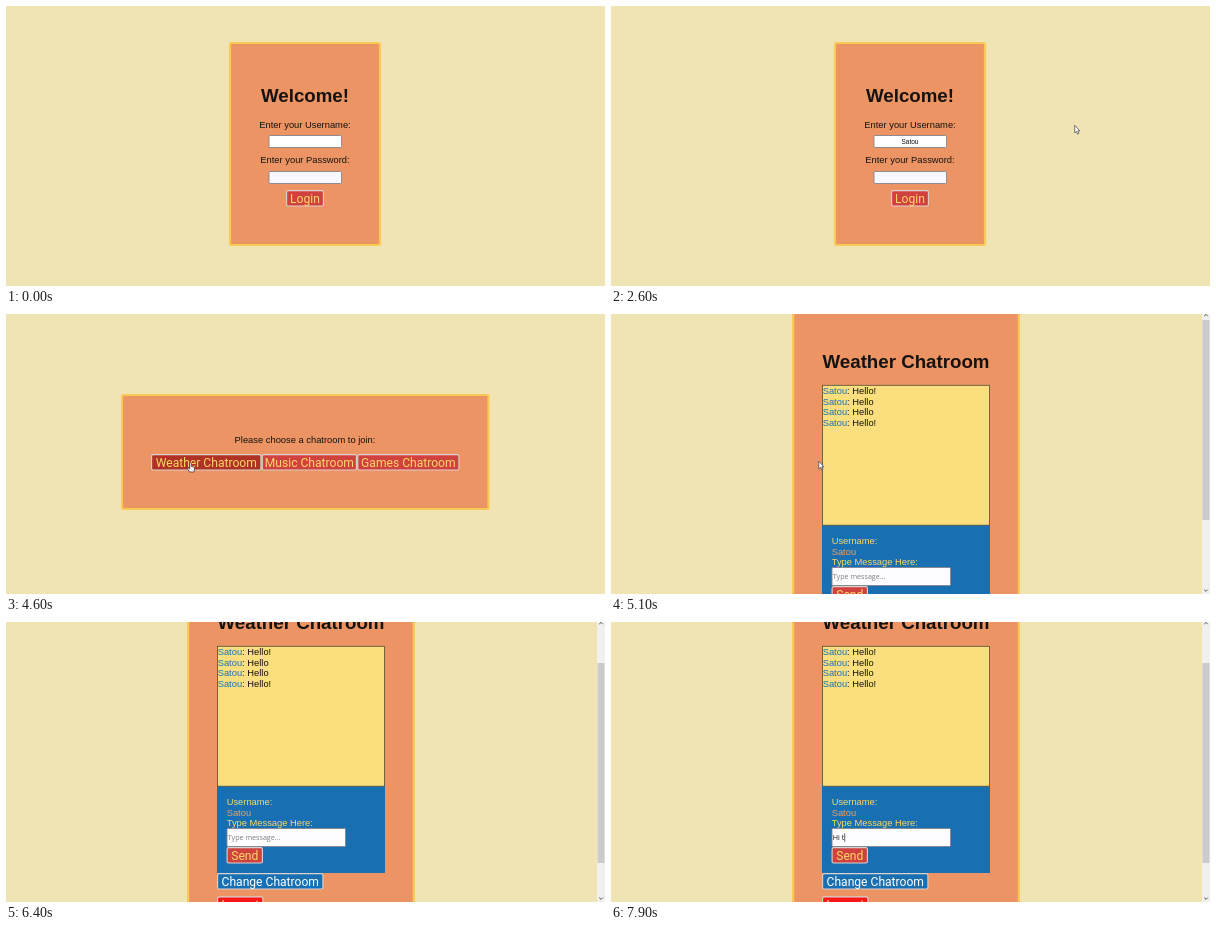
An HTML page for the animation above (8 s loop, 599 px wide and 280 px high).

```html
<!DOCTYPE html>
<html lang="en">
<head>
<meta charset="utf-8">
<title>Chat login</title>
<style>
  html, body { margin: 0; width: 100%; height: 100%; overflow: hidden; background: #f0e4b4; }
  svg { display: block; width: 599px; height: 280px; }
  text { font: 9.36px "Liberation Sans", Arial, sans-serif; fill: #151311; white-space: pre; }
  .title { font-size: 18.72px; font-weight: bold; }
  .btn { font: 12.1px Roboto, "Noto Sans", sans-serif; }
  .small { font: 5.35px "Open Sans", "Noto Sans", sans-serif; }
  .field { font: 7.15px "Open Sans", "Noto Sans", sans-serif; }
  .name { font-size: 6.5px; }
  .mid { text-anchor: middle; }
</style>
</head>
<body>
<svg id="stage" viewBox="0 0 599 280"></svg>
<script>
const LOOP = 8000, STEP = 100;
const USER = "Satou";
const C = {
  panel: "#ec9463", edge: "#fbc958", red: "#d1423f", hover: "#b03224",
  gold: "#fbd968", blue: "#1870b2", box: "#fbdf7f", line: "#85858f"
};

// markup helpers
const rect = (x, y, w, h, fill, extra = "") =>
  `<rect x="${x}" y="${y}" width="${w}" height="${h}" fill="${fill}" ${extra}/>`;
const text = (x, y, str, cls = "", fill = "") =>
  `<text x="${x}" y="${y}" class="${cls}"${fill && ` style="fill:${fill}"`}>${str}</text>`;
const group = (id, body) => `<g id="${id}">${body}</g>`;
const panel = (x, y, w, h) =>
  rect(x + 1, y + 1, w - 2, h - 2, C.panel, `rx="1.5" stroke="${C.edge}" stroke-width="2.2"`);
const input = (x, y, w, h, fill = "#fff") =>
  rect(x + .5, y + .5, w - 1, h - 1, fill, `rx="1" stroke="${C.line}" stroke-width=".9"`);
const button = (x, y, w, label, id = "", fill = C.red, ink = C.gold) =>
  rect(x + .6, y + .6, w - 1.2, 15.4, fill, `id="${id}" rx="1.6" stroke="#dcd2cf" stroke-width="1.1"`) +
  text(x + w / 2, y + 13, label, "btn mid", ink);

const popup =
  rect(264, 144, 95, 42, "#54443c", 'opacity=".65"') +
  rect(262.5, 142.5, 95, 42, "#fdfcfd", 'stroke="#9b9698" stroke-width=".8"') +
  rect(263, 168.5, 94, 15.6, "#ececed") +
  rect(265, 154.6, 4.6, 3.8, "#5c5659", 'rx=".5"') +
  '<path d="M265.9 155v-1.2a1.4 1.6 0 0 1 2.8 0V155" fill="none" stroke="#5c5659" stroke-width=".9"/>' +
  '<path d="M264.2 158.8l6-6.4" stroke="#d0324a" stroke-width="1"/>' +
  ["This connection is not secure.", "Logins entered here could be", "compromised. Learn More"]
    .map((s, i) => text(272, 150.2 + i * 7.5, s, "small", "#77737a")).join("") +
  text(309.5, 178.8, "View Saved Logins", "small mid", "#252326");

const login =
  panel(223, 36, 152, 204) +
  text(299, 96, "Welcome!", "title mid") +
  text(299, 121.5, "Enter your Username:", "mid") +
  input(262.5, 129, 73.5, 13) +
  text(299, 138.3, "", "name mid").replace("<text", '<text id="user"') +
  text(299, 157.3, "Enter your Password:", "mid") +
  input(262.5, 165, 73.5, 13, "#f9f8fe") +
  group("dots", "") +
  button(280, 184, 38, "Login") +
  group("popup", popup);

const rooms =
  panel(115, 80, 368.5, 116) +
  text(299, 128.5, "Please choose a chatroom to join:", "mid") +
  button(145, 140, 110.5, "Weather Chatroom", "weather") +
  button(255.7, 140, 95.3, "Music Chatroom") +
  button(351.2, 140, 102.3, "Games Chatroom");

const messages = ["Hello!", "Hello", "Hello", "Hello!"].map((m, i) =>
  text(211.7, 80 + i * 10.65, `<tspan fill="${C.blue}" style="fill:${C.blue}">${USER}</tspan>: ${m}`)).join("");

const chat =
  rect(181, 0, 228, 280, C.edge) +
  rect(183.2, 0, 223.6, 280, C.panel) +
  group("page",
    text(295, 54, "Weather Chatroom", "title mid") +
    rect(211, 211, 168, 87, C.blue) +
    rect(211.5, 71.3, 167, 139.9, C.box, 'stroke="#54502f" stroke-width=".8"') +
    messages +
    text(220.7, 230, "Username:", "", C.gold) +
    text(220.7, 240.6, USER, "", "#e9a066") +
    text(220.7, 251.2, "Type Message Here:", "", C.gold) +
    input(220.5, 253, 119.5, 19, "#fdfcfe") +
    '<text id="draft" class="field" x="221.8" y="265.4"></text>' +
    rect(0, 258.4, .7, 8.4, "#222", 'id="caret"') +
    button(220.5, 272, 36.5, "Send") +
    button(211, 298, 106.5, "Change Chatroom", "", C.blue, "#fff") +
    button(211, 321.3, 46.5, "Logout", "", "#fa1716", "#fbe08a")) +
  rect(591, 0, 8, 280, "#f1f0f1") +
  rect(591.5, 0, 7, 200, "#cbcacc", 'id="thumb"') +
  '<path d="M593.2 2.2l1.8-1.8 1.8 1.8M593.2 275.6l1.8 1.8 1.8-1.8" fill="none" stroke="#555" stroke-width="1"/>';

const status =
  rect(-1, 271, 141, 10, "#e9e7e5", 'stroke="#d2cec4" stroke-width=".5"') +
  text(1, 277.5, "Waiting for xml-chat-app.satouminakawa.com...", "small", "#4c4a4a");

const arrow = '<path d="M0 0V7.6L1.7 6.1 2.9 8.8 4.1 8.3 3 5.6H5.2Z" fill="#fff" stroke="#3b3a4c" stroke-width=".7"/>';
const hand = '<path d="M-.8 .3Q0-.6 .8 .3V3.4L3.6 4.2Q4.4 4.6 4.1 6L3.4 9H-.9L-3 5.8Q-3.2 4.5-2 4.9L-.8 5.9Z" fill="#fff" stroke="#2b2224" stroke-width=".7"/>';

document.getElementById("stage").innerHTML =
  rect(0, 0, 599, 280, "#f0e4b4") +
  group("login", login) + group("rooms", rooms) + group("chat", chat) +
  group("status", status) + group("arrow", arrow) + group("hand", hand);

const $ = id => document.getElementById(id);
const show = (id, on) => $(id).setAttribute("visibility", on ? "inherit" : "hidden");
const move = (id, x, y) => $(id).setAttribute("transform", `translate(${x} ${y})`);
const within = (t, a, b) => t >= a && t < b;
const typed = (t, start, gap, max) =>
  Math.max(0, Math.min(max, Math.floor((t - start) / gap) + 1));
const ease = p => p * p * (3 - 2 * p);

// rows: time, value, value...
function track(rows, t) {
  let i = rows.findIndex(r => r[0] > t);
  if (i < 0) return rows.at(-1).slice(1);
  if (i === 0) return rows[0].slice(1);
  const a = rows[i - 1], b = rows[i], p = ease((t - a[0]) / (b[0] - a[0]));
  return a.slice(1).map((v, k) => v + (b[k + 1] - v) * p);
}

const POINTER = [
  [1000, 325, 135], [1500, 463.7, 119.3], [3900, 463.7, 119.3], [4500, 184.5, 149],
  [5000, 184.5, 149], [5500, 408.3, 132.3], [5900, 408.3, 132.3], [6300, 330, 216]
];
const SCROLL = [[5900, 0], [6200, 47]];

function draw(t) {
  const onLogin = t < 3800, onChat = t >= 5000, overRoom = within(t, 4400, 5000);
  show("login", onLogin);
  show("rooms", !onLogin && !onChat);
  show("chat", onChat);
  show("status", within(t, 3500, 3800) || within(t, 4800, 5000));

  const atPassword = within(t, 2800, 3000);
  show("popup", onLogin && (within(t, 700, 2000) || atPassword));
  move("popup", 0, atPassword ? 36 : 0);
  $("user").textContent = USER.slice(0, typed(t, 2000, 150, 5));
  const dots = typed(t, 3000, 100, 5);
  $("dots").innerHTML = Array.from({ length: dots }, (_, i) =>
    `<circle cx="${299 + (i - (dots - 1) / 2) * 3.9}" cy="172" r="1.55" fill="#17141c"/>`).join("");
  $("weather").setAttribute("fill", overRoom ? C.hover : C.red);

  const [y] = track(SCROLL, t);
  move("page", 0, -y);
  move("thumb", 0, 6 + y * .745);
  const draft = "Hi t".slice(0, typed(t, 7300, 200, 4));
  $("draft").textContent = draft || "Type message...";
  $("draft").style.fill = draft ? "#151311" : "#807d84";
  show("caret", onChat && (draft || within(t, 6700, 7200)));
  move("caret", 222 + (draft ? $("draft").getComputedTextLength() : 0), 0);

  const [px, py] = track(POINTER, t);
  show("arrow", within(t, 1100, 6300) && !overRoom);
  show("hand", overRoom);
  move("arrow", px, py);
  move("hand", px, py);
}

const start = performance.now();
function tick() {
  const t = (performance.now() - start) % LOOP;
  draw(Math.floor(t / STEP) * STEP);
  requestAnimationFrame(tick);
}
tick();
</script>
</body>
</html>
```
